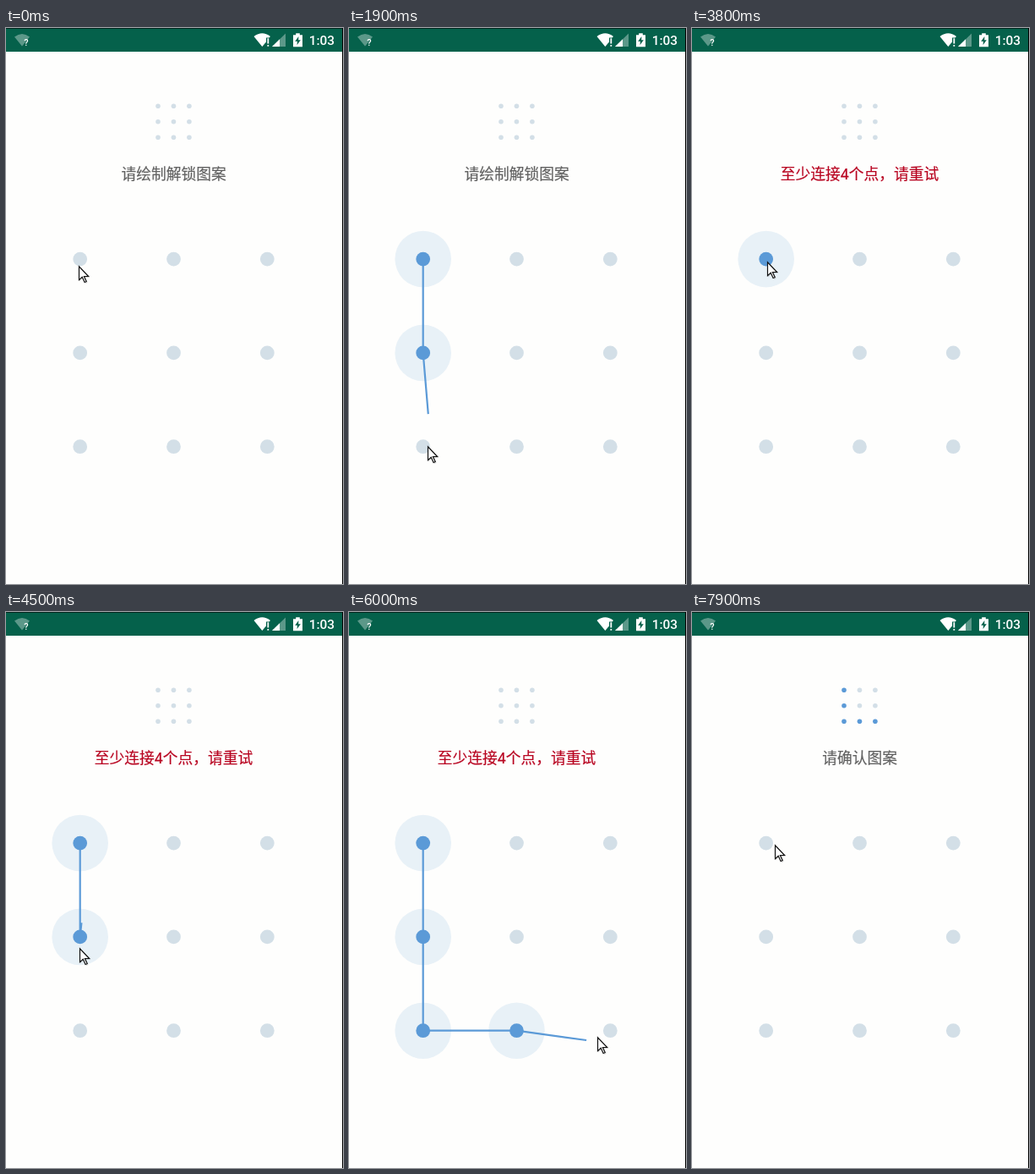
An HTML page for the animation above (8 s loop, 399x657 px).

```html
<!DOCTYPE html>
<html lang="zh-CN">
<head>
<meta charset="utf-8">
<title>Pattern lock</title>
<style>
  html, body { margin: 0; width: 100%; height: 100%; overflow: hidden; background: #fefefd; }
  svg { display: block; }
  text { font-family: Roboto, "Noto Sans CJK SC", "Noto Sans CJK", sans-serif; }
</style>
</head>
<body>
<svg width="399" height="657" viewBox="0 0 399 657">
  <rect width="399" height="657" fill="#fefefd"/>
  <rect width="399" height="28" fill="#05614b"/>
  <rect width="399" height="1" fill="#01261d"/>
  <g fill="#fff">
    <path d="M10 10.5Q19 3.5 28 10.5L19 21.5Z" opacity=".35"/>
    <text x="21.3" y="20.5" font-size="11" font-weight="500">?</text>
    <path d="M293.5 10Q303.3 2.5 313 10L311.5 11.5H308V16.5L303.3 22Z"/>
    <path d="M309.4 12.3H311.2V18.4H309.4ZM309.4 20H311.2V21.8H309.4Z"/>
    <path d="M331 6.5V22H315Z" opacity=".35"/>
    <path d="M324 13.3V22H315Z"/>
    <path d="M340 8.2H343.2V6.3H347.8V8.2H351V22.3H340Z"/>
    <path d="M346.4 10L342.2 15.8H344.9L344.6 20L348.8 14.2H346.2Z" fill="#05614b"/>
    <text x="358.8" y="20.3" font-size="15.4" font-weight="500">1:03</text>
  </g>
  <g id="indicator"></g>
  <text id="message" x="198.6" y="179.2" font-size="17.75" stroke-width=".2" text-anchor="middle"></text>
  <g id="halos"></g>
  <polyline id="trail" fill="none" stroke-width="2.2" stroke-linejoin="round"/>
  <g id="dots"></g>
  <g id="cursor">
    <path d="M0 0V17.4L4.1 13.8L7 20L9.6 18.9L7 13H12.4Z" transform="translate(1 1)" opacity=".15"/>
    <path d="M.5 .8V16.6L4.2 13.3L7.1 19.5L9.2 18.5L6.4 12.5H11.6Z" fill="#fff" stroke="#111" stroke-width="1.2"/>
  </g>
  <rect x="398" width="1" height="657"/>
</svg>
<script>
const LOOP = 8000, STEP = 100, HIT_RADIUS = 30;
const BLUE = '#5b9ad7', RED = '#b80420', IDLE = '#d3dfe7', GREY = '#626262';
const $ = id => document.getElementById(id);

// Eased pointer moves between resting places; bow bends the way sideways.
const moves = [
  { start: 0, end: 300, to: [87, 279] },
  { start: 700, end: 2000, to: [93, 497] },
  { start: 2700, end: 3600, to: [89, 276], bow: [20, 0] },
  { start: 4050, end: 4900, to: [85, 497] },
  { start: 4950, end: 6275, to: [318, 497], bow: [0, 8] },
  { start: 7000, end: 7900, to: [98, 275] }
];

// The touch trails the pointer by lag.
const strokes = [
  { start: 700, release: 2300, clear: 2700, lag: 285, error: true },
  { start: 3800, release: 6700, clear: 7000, lag: 80 }
];

function pointer(t) {
  let at = [86, 281];
  for (const { start, end, to, bow = [0, 0] } of moves) {
    if (t <= start) break;
    const u = Math.min(1, (t - start) / (end - start));
    const ease = (1 - Math.cos(Math.PI * u)) / 2;
    const bend = Math.sin(Math.PI * u);
    at = at.map((from, axis) => from + (to[axis] - from) * ease + bow[axis] * bend);
  }
  return at;
}

function touch(stroke, t) {
  const [x, y] = pointer(Math.max(stroke.start, t - stroke.lag));
  return [x + 2, y + 3];
}

const cells = [...Array(9).keys()];
const place = (i, x, y, gap) => [x + (i % 3) * gap, y + Math.floor(i / 3) * gap];
const center = i => place(i, 87.7, 273.1, 110.8);

function hitCells(stroke, until) {
  const hit = new Set();
  for (let t = stroke.start; t <= Math.min(until, stroke.release); t += STEP) {
    const [x, y] = touch(stroke, t);
    for (const i of cells) {
      const [cx, cy] = center(i);
      if (Math.hypot(x - cx, y - cy) < HIT_RADIUS) hit.add(i);
    }
  }
  return [...hit];
}

function circles(parent, radius, position) {
  return cells.map(i => {
    const circle = document.createElementNS('http://www.w3.org/2000/svg', 'circle');
    const [x, y] = position(i);
    circle.setAttribute('cx', x);
    circle.setAttribute('cy', y);
    circle.setAttribute('r', radius);
    return $(parent).appendChild(circle);
  });
}

const halos = circles('halos', 33.3, center);
const dots = circles('dots', 8.4, center);
const marks = circles('indicator', 2.8, i => place(i, 180, 92.3, 18.45));
const [failed, accepted] = strokes;

function messageAt(t) {
  if (t < failed.release) return ['请绘制解锁图案', GREY];
  if (t < accepted.release) return ['至少连接4个点，请重试', RED];
  return ['请确认图案', GREY];
}

function render(t) {
  const stroke = strokes.find(s => t >= s.start && t < s.clear);
  const hit = stroke ? hitCells(stroke, t) : [];
  const saved = t >= accepted.release ? hitCells(accepted, t) : [];
  const released = stroke && t >= stroke.release;
  const wrong = released && stroke.error;
  const color = wrong ? RED : BLUE;

  for (const i of cells) {
    const on = hit.includes(i);
    halos[i].setAttribute('fill', !on ? 'none' : wrong ? '#f6dfe1' : '#e8f1f7');
    dots[i].setAttribute('fill', on ? color : IDLE);
    marks[i].setAttribute('fill', saved.includes(i) ? BLUE : IDLE);
  }

  const points = hit.map(center);
  if (stroke && !released) points.push(touch(stroke, t));
  $('trail').setAttribute('points', points.join(' '));
  $('trail').setAttribute('stroke', color);

  const [label, fill] = messageAt(t);
  $('message').textContent = label;
  $('message').setAttribute('fill', fill);
  $('message').setAttribute('stroke', fill);
  $('cursor').setAttribute('transform', `translate(${pointer(t).map(Math.round)})`);
}

const start = performance.now();
function tick() {
  const t = (performance.now() - start) % LOOP;
  render(Math.floor(t / STEP) * STEP);
  requestAnimationFrame(tick);
}
tick();
</script>
</body>
</html>
```
